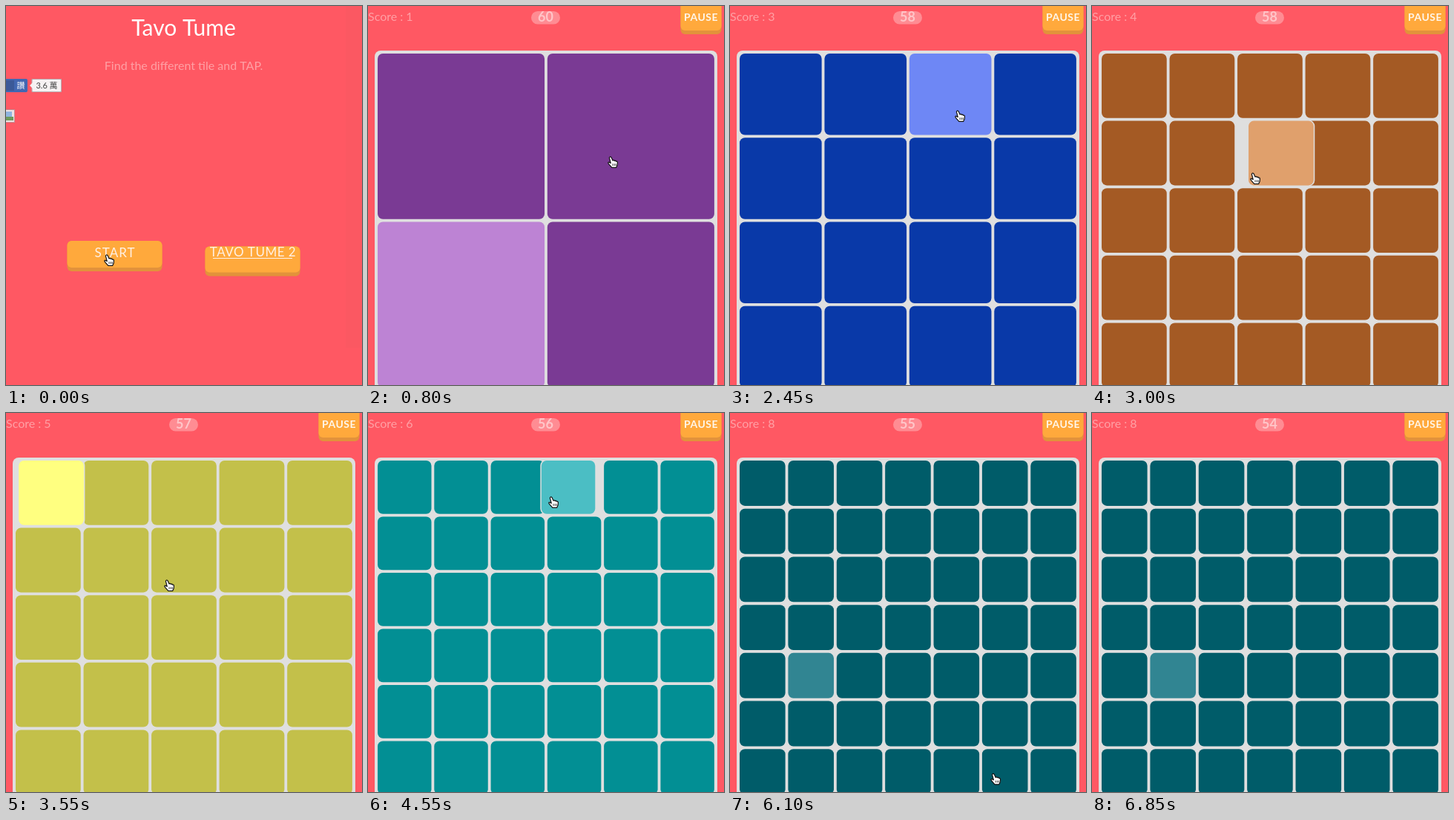
An HTML page with a canvas that plays this animation: 480x510 px, repeating every 6900 ms.

```html
<!DOCTYPE html>
<html lang="en">
<head>
<meta charset="utf-8">
<title>Find the tile</title>
<style>
html, body { margin: 0; width: 100%; height: 100%; overflow: hidden; background: #ff5863; }
canvas { display: block; }
</style>
</head>
<body>
<canvas id="stage" width="480" height="510"></canvas>
<script>
const ctx = document.getElementById('stage').getContext('2d');
const LOOP = 6900, STEP = 50, GAME_START = 250;
const SHAKE = { size: 15, period: 200, length: 400 };
const FONT = 'Lato, "Open Sans", sans-serif';
const PINK = '#ffa0a5', BOARD = '#dfdfdf';

// One entry per score; col and row locate the odd tile.
const rounds = [
  { at: 250, shake: 300, n: 2, col: 1, row: 0, base: '#3f8f3c', odd: '#8bd487' },
  { at: 800, shake: 850, n: 2, col: 0, row: 1, base: '#7a3a94', odd: '#bd83d4' },
  { at: 1200, shake: 1250, n: 3, col: 2, row: 1, base: '#8a2c27', odd: '#e88a82' },
  { at: 1900, shake: 1950, n: 4, col: 2, row: 0, base: '#0939a8', odd: '#6e87f5' },
  { at: 2600, shake: 2650, n: 5, col: 2, row: 1, base: '#a45a24', odd: '#e0a06c' },
  { at: 3300, shake: 3359, n: 5, col: 0, row: 0, base: '#c3c04a', odd: '#ffff80' },
  { at: 4200, shake: 4268, n: 6, col: 3, row: 0, base: '#028f94', odd: '#4bbec4' },
  { at: 5200, shake: 5265, n: 6, col: 4, row: 4, base: '#787a73', odd: '#a5a9a1' },
  { at: 5800, shake: 6400, n: 7, col: 1, row: 4, base: '#005c69', odd: '#318592' }
];

// Pointer path: time, x, y
const path = [
  [0, 139, 342], [250, 139, 342], [600, 330, 210], [800, 330, 210],
  [1050, 180, 350], [1200, 180, 350], [1550, 392, 318], [1900, 392, 318],
  [2300, 310, 148], [2600, 310, 148], [3000, 220, 232], [3550, 220, 232],
  [3950, 75, 112], [4200, 75, 112], [4500, 250, 120], [5200, 250, 120],
  [5550, 353, 372], [5800, 353, 385], [6250, 360, 530], [LOOP, 360, 530]
];

const hand = new Path2D('M-4.6-5.6Q-4-8-2-6.4L0-2Q1.5-3.4 2.4-1.6Q4-2.6 4.6-.8' +
  'Q6.4-1.4 6.4 .6L6.2 4L4.6 7.4H-1.2L-5.4 2.6Q-7 .2-5.4 0L-2.8 1.4Z');
const knuckles = new Path2D('M0 2.2V5M2.2 2.2V5M4.2 2.2V5');

function box(x, y, w, h, r, color) {
  ctx.fillStyle = color;
  ctx.beginPath();
  ctx.roundRect(x, y, w, h, r);
  ctx.fill();
}

function text(str, x, y, size, color, { weight = 400, align = 'center', gap = 0 } = {}) {
  ctx.font = `${weight} ${size}px ${FONT}`;
  ctx.textAlign = align;
  ctx.letterSpacing = gap + 'px';
  ctx.fillStyle = color;
  ctx.fillText(str, x, y);
}

function button(x, y, w, h) {
  box(x, y, w, h, 6, '#e2923b');
  box(x, y, w, h - 5, 6, '#ffa93c');
}

function drawMenu() {
  ctx.fillStyle = '#fb5862';
  ctx.fillRect(458, 0, 22, 460);
  text('Tavo Tume', 239.5, 40, 30, '#fff');
  text('Find the different tile and TAP.', 239.5, 86, 16, PINK);

  box(-4, 98, 33, 18, 2, '#4267b2');
  box(0, 100, 11, 14, 0, '#3b5998');
  text('讚', 20, 111, 11, '#fff');
  box(34.5, 98, 40.5, 18, 1, '#b9a9ae');
  box(35.5, 99, 38.5, 16, 1, '#f6f2f3');
  ctx.beginPath();
  ctx.moveTo(36, 103);
  ctx.lineTo(32, 107);
  ctx.lineTo(36, 111);
  ctx.fill();
  text('3.6 萬', 55, 111, 11, '#444');

  // Missing picture
  box(-4, 139, 16, 18, 0, '#c58b91');
  box(-4, 140, 15, 16, 0, '#eee2e4');
  box(0, 142, 8, 7, 0, '#8fb4e0');
  box(0, 149, 10, 5, 0, '#6d9a5c');

  button(82.5, 316, 128, 41);
  text('START', 147, 338, 17, '#fff0e4', { gap: 1 });
  button(268.5, 323.5, 128, 40);
  text('TAVO TUME 2', 333, 337, 17, '#fff0e4', { gap: .5 });
  ctx.fillRect(279, 339, 107, 1);
}

function drawTile(round, col, row, shift, color) {
  const dx = 457.7 / round.n, dy = 453 / round.n;
  const x = 13 + col * dx + shift, y = 64 + row * dy;
  if (shift) box(x - 1.5, y - 1, dx - .8, dy - 1.8, 8, BOARD);
  box(x, y, dx - 3.8, dy - 3.8, 7, color);
}

function shakeAt(t) {
  if (t <= 0 || t >= SHAKE.length) return 0;
  return -SHAKE.size * Math.sin(2 * Math.PI * t / SHAKE.period);
}

function drawGame(t) {
  const score = rounds.findLastIndex(r => t >= r.at);
  const round = rounds[score];
  const left = 60 - Math.floor((t - GAME_START) / 1000);

  text('Score : ' + score, 0, 20, 16, PINK, { align: 'left' });
  box(220, 7, 39, 17.5, 9, '#ff8c93');
  text(left, 239.5, 21, 18, '#ffc5c8', { weight: 700 });
  button(421.5, -6, 55, 44);
  text('PAUSE', 449, 20, 14, '#fff6ea', { weight: 700, gap: .5 });

  box(9, 60, 462, 470, 8, BOARD);
  for (let row = 0; row < round.n; row++)
    for (let col = 0; col < round.n; col++)
      if (col !== round.col || row !== round.row)
        drawTile(round, col, row, 0, round.base);
  drawTile(round, round.col, round.row, shakeAt(t - round.shake), round.odd);
}

function drawPointer(t) {
  const i = path.findIndex(p => p[0] > t);
  const [t0, x0, y0] = path[i - 1], [t1, x1, y1] = path[i];
  const u = (t - t0) / (t1 - t0), e = u * u * (3 - 2 * u);
  ctx.save();
  ctx.translate(x0 + (x1 - x0) * e, y0 + (y1 - y0) * e);
  ctx.fillStyle = '#fff';
  ctx.strokeStyle = '#111';
  ctx.lineWidth = 1.2;
  ctx.lineJoin = 'round';
  ctx.fill(hand);
  ctx.stroke(hand);
  ctx.lineWidth = .8;
  ctx.stroke(knuckles);
  ctx.restore();
}

function frame() {
  const t = Math.floor(performance.now() % LOOP / STEP) * STEP;
  ctx.fillStyle = '#ff5863';
  ctx.fillRect(0, 0, 480, 510);
  if (t < GAME_START) drawMenu();
  else drawGame(t);
  drawPointer(t);
  requestAnimationFrame(frame);
}
frame();
</script>
</body>
</html>
```
